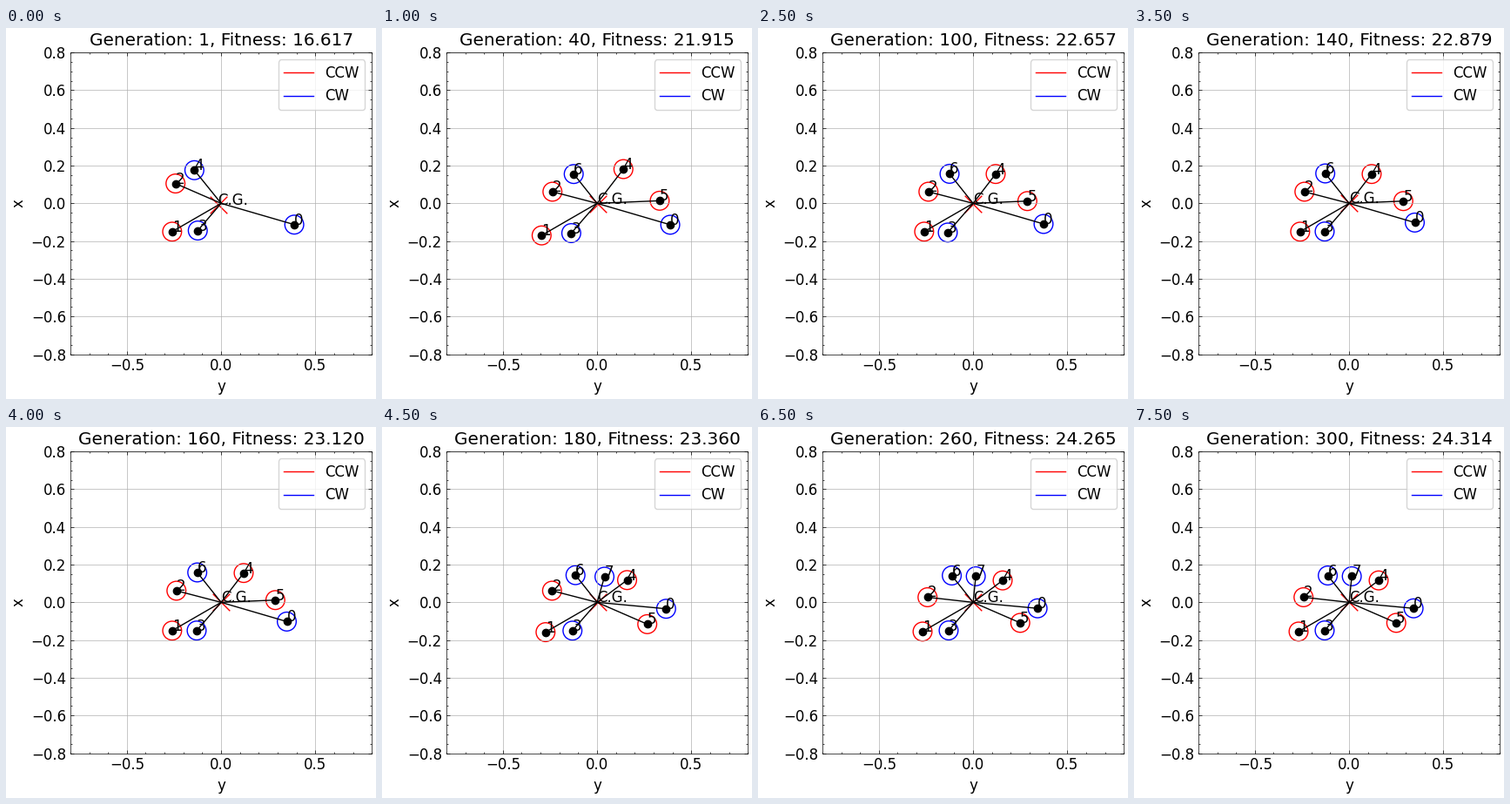
Write a matplotlib script that moves like this. It is 425 by 426 pixels and loops after 8000 ms.

```python
import numpy as np
import matplotlib.pyplot as plt
from matplotlib.animation import FuncAnimation
from matplotlib.patches import Circle
from matplotlib.ticker import AutoMinorLocator, MultipleLocator

W, H, DPI = 425, 426, 100
LEFT, BOTTOM, SIDE = 73.85, 51.4, 346.5  # axes square in pixels
LIMIT = 0.8
ROTOR_RADIUS = 0.05
CG_SHIFT = 0.215  # share of the mean rotor offset that moves the centre of gravity
STEPS, STRIDE = 16, 20

plt.rcParams.update({
    "font.family": "DejaVu Sans",
    "font.size": 12,
    "axes.linewidth": 0.5,
    "grid.linewidth": 0.5,
    "lines.linewidth": 1,
    "xtick.top": True,
    "ytick.right": True,
})
for axis in ("xtick", "ytick"):
    plt.rcParams[f"{axis}.direction"] = "in"
    for level, size in (("major", 3), ("minor", 1.5)):
        plt.rcParams[f"{axis}.{level}.size"] = size
        plt.rcParams[f"{axis}.{level}.width"] = 0.5


def arm(angle, length, shrink=1, turn=0):
    """Polar start and end of a rotor arm."""
    return np.array([(angle, length), (angle + turn, length * shrink)])


FIVE = [arm(-16.2, .404), arm(210, .300), arm(156.5, .264),
        arm(229.3, .190), arm(128.9, .226)]
SEVEN = [arm(-16.3, .404, .898), arm(210, .340, .882), arm(165.4, .245),
         arm(229, .209, .947), arm(52.5, .229, .857), arm(2.4, .332, .867),
         arm(128.6, .199, 1.02)]
EIGHT = [arm(-5.3, .3675, .934), arm(210, .316, .98),
         arm(165.5, .247, .986, turn=8.1), arm(228.9, .199, .993),
         arm(36.6, .198, .985), arm(-23.5, .290, .94),
         arm(128.5, .1843, .987), arm(74, .1415, .982, turn=10.2)]

# First generation, generations until settled, arms
PHASES = [(1, 1, FIVE), (20, 20, FIVE[:4] + SEVEN[4:]),
          (40, 100, SEVEN), (180, 40, EIGHT)]

FITNESS = {1: 16.617, 40: 21.915, 100: 22.657, 140: 22.879,
           180: 23.360, 220: 24.217, 300: 24.314}


def is_clockwise(index, count):
    return index % 3 == 0 or index == count - 1


def rotors_at(generation):
    """Rotor positions; clockwise arms ease in, the others settle early."""
    start, span, arms = [p for p in PHASES if p[0] <= generation][-1]
    u = min(1, (generation - start) / span)
    points = []
    for i, (first, last) in enumerate(arms):
        ease = u ** 2 if is_clockwise(i, len(arms)) else min(1, 5 * u)
        angle, length = first + (last - first) * ease
        theta = np.radians(angle)
        points.append((length * np.cos(theta), length * np.sin(theta)))
    return points


fig = plt.figure(figsize=((W + 1e-6) / DPI, (H + 1e-6) / DPI), dpi=DPI,
                 facecolor="white")
ax = fig.add_axes([LEFT / W, BOTTOM / H, SIDE / W, SIDE / H])
ax.set(xlim=(-LIMIT, LIMIT), ylim=(-LIMIT, LIMIT), xlabel="y", ylabel="x")
ax.xaxis.set_major_locator(MultipleLocator(0.5))
ax.yaxis.set_major_locator(MultipleLocator(0.2))
ax.xaxis.set_minor_locator(AutoMinorLocator(5))
ax.yaxis.set_minor_locator(AutoMinorLocator(4))
ax.grid(True)
ax.plot([], [], color="red", label="CCW")
ax.plot([], [], color="blue", label="CW")
ax.legend(loc="upper right")
title = ax.set_title("")

drawn = []


def update(step):
    while drawn:
        drawn.pop().remove()

    generation = max(1, step * STRIDE)
    fitness = np.interp(generation, list(FITNESS), list(FITNESS.values()))
    title.set_text(f"Generation: {generation}, Fitness: {fitness:.3f}")

    rotors = rotors_at(generation)
    cg = CG_SHIFT * np.mean(rotors, axis=0)
    drawn.append(ax.scatter(*cg, s=200, marker="x", color="red", linewidths=1))
    drawn.append(ax.text(*cg, "C.G."))

    for i, (x, y) in enumerate(rotors):
        color = "blue" if is_clockwise(i, len(rotors)) else "red"
        drawn.extend(ax.plot([0, x], [0, y], color="black"))
        drawn.extend(ax.plot(x, y, "o", color="black"))
        drawn.append(ax.add_patch(Circle((x, y), ROTOR_RADIUS, fill=False,
                                         edgecolor=color, linewidth=1)))
        drawn.append(ax.text(x, y, str(i)))
    return drawn + [title]


anim = FuncAnimation(fig, update, frames=STEPS, interval=500,
                     repeat=True, repeat_delay=0, blit=False)
plt.show()
```
